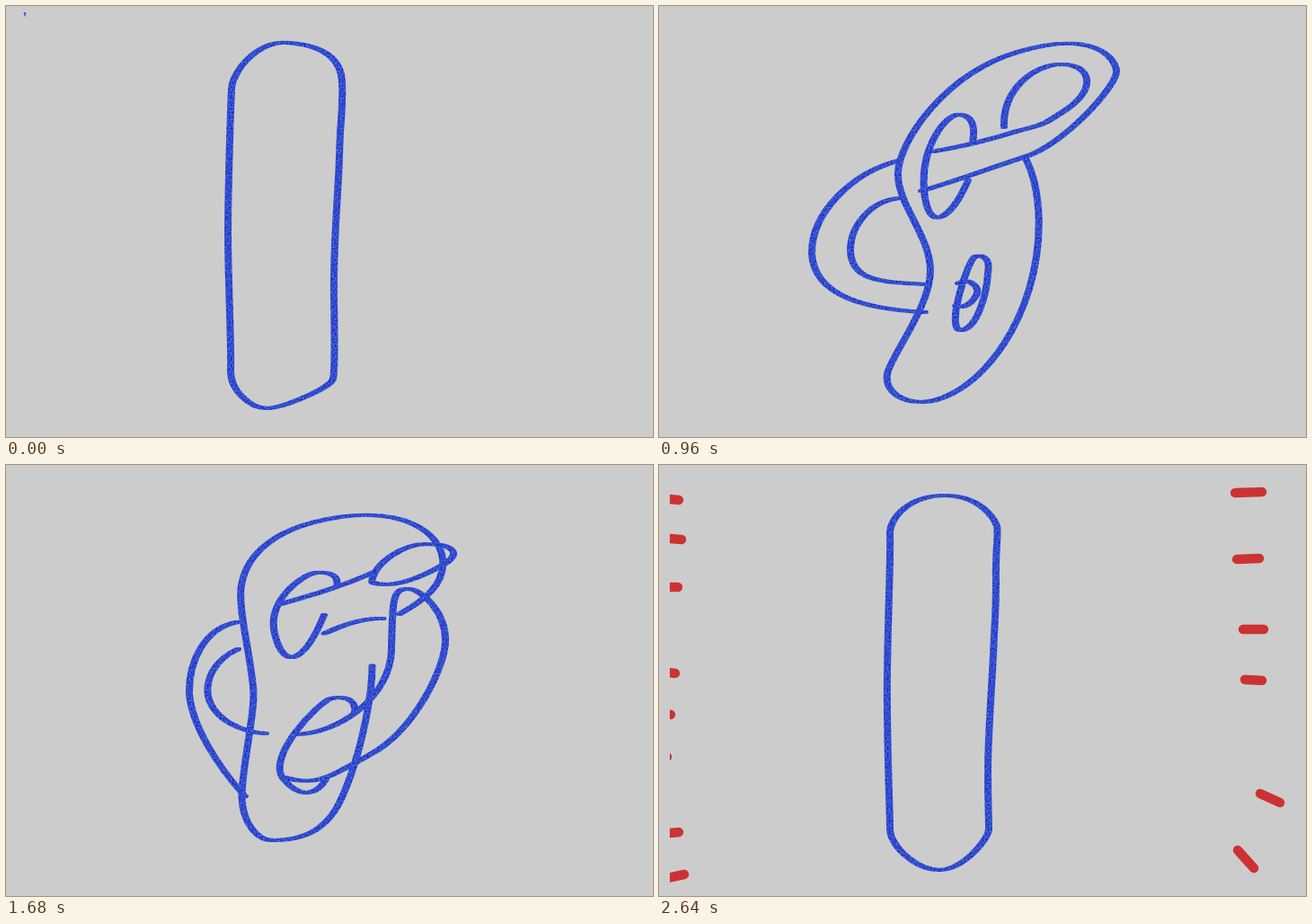
These frames come from a looping animation (720x480 px, 2.76 s). An HTML page without scripts:

```html
<!DOCTYPE html>
<html lang="en">
<head>
<meta charset="utf-8">
<title>Knotting balloon</title>
<style>
  html, body { margin: 0; width: 100%; height: 100%; overflow: hidden; background: #ccc; }
  svg { display: block; width: 100vw; height: 100vh; }
  path { fill: none; stroke-linecap: round; stroke-linejoin: round; }
  .ink { stroke: #33c; stroke-width: 4; filter: url(#crayon); }

  /* Drawings change every 120 ms: 23 in a loop */
  path, .part { animation: 2760ms -5ms infinite; }
  path { animation-timing-function: steps(4); }
  .part { animation-timing-function: step-end; }

  #body { animation-name: body; }
  #eye { animation-name: eye; }
  #slot { animation-name: slot; }
  #loop { animation-name: loop; }
  #hole { animation-name: hole; }
  #arm { animation-name: arm; }
  #rays { animation-name: rays; stroke: #cd3232; }
  .dot { animation-name: show-dot; }
  .fold { animation-name: show-fold; }
  .bow { animation-name: show-bow; }
  .grip { animation-name: show-grip; }
  .curl { animation-name: show-curl; }
  .burst { animation-name: show-burst; }

  @keyframes show-dot { 0% { opacity: 1 } 4.3478%, 100% { opacity: 0 } }
  @keyframes show-fold { 0% { opacity: 0 } 13.0435% { opacity: 1 } 65.2174%, 100% { opacity: 0 } }
  @keyframes show-bow { 0% { opacity: 0 } 21.7391% { opacity: 1 } 65.2174%, 100% { opacity: 0 } }
  @keyframes show-grip { 0% { opacity: 0 } 26.087% { opacity: 1 } 65.2174%, 100% { opacity: 0 } }
  @keyframes show-curl { 0% { opacity: 0 } 65.2174% { opacity: 1 } 78.2609%, 100% { opacity: 0 } }
  @keyframes show-burst { 0% { opacity: 0 } 86.9565%, 100% { opacity: 1 } }

  @keyframes body {
    0% { d: path("M370 190 C367 245 364 280 365 330 S366 405 364 415 S308 448 290 448 S249 428 250 405 S247 300 247 255 S250 110 251 92 S278 38 315 41 S373 58 374 85 S373 125 372 140 M372 140 C371 160 371 175 370 190") }
    17.3913% { d: path("M384 192 C398 225 400 280 393 325 S368 412 352 428 S315 452 292 452 S250 437 251 415 S275 360 274 325 S256 248 257 205 S300 83 390 55 S520 45 521 72 S435 175 384 191 M384 191 C350 201 330 205 300 211") }
    34.7826% { d: path("M407 168 C427 205 427 265 412 315 S371 396 355 411 S315 441 292 441 S251 429 254 410 S302 335 302 295 S264 220 266 185 S318 75 400 51 S507 56 509 72 S450 155 407 168 M407 168 C364 182 330 195 292 206") }
    52.1739% { d: path("M406 322 C402 345 395 362 382 379 S362 398 345 408 S310 422 295 422 S266 400 266 380 S291 297 291 275 S253 215 258 180 S292 90 400 62 S530 62 532 82 S500 125 467 144 M430 154 C380 152 335 172 300 187") }
    69.5652% { d: path("M409 125 C413 175 395 265 386 310 S369 382 355 397 S318 414 298 414 S260 395 259 360 S259 275 260 240 S264 115 265 95 S280 54 330 56 S436 90 440 128 S428 178 409 188 M409 188 C409 188 409 188 409 188") }
    86.9565% { d: path("M378 190 C377 245 370 290 370 340 S369 392 367 405 S328 447 305 447 S252 425 250 405 S249 260 249 200 S254 105 255 82 S280 34 320 35 S380 55 380 75 S380 115 379 140 M379 140 C379 160 378 175 378 190"); animation-timing-function: steps(2) }
    95.6522%, 100% { d: path("M373 190 C371 240 366 300 366 340 S367 392 367 405 S337 451 312 451 S257 425 257 405 S253 300 254 230 S258 98 257 78 S280 33 320 34 S374 62 376 68 S374 100 375 130 M375 130 C375 155 374 170 373 190") }
  }
  @keyframes eye {
    0%, 17.3913% { d: path("M375 145 C377 95 415 71 448 71 S488 98 458 113 S425 129 400 139 M400 139 C370 150 335 160 303 169") }
    34.7826% { d: path("M384 135 C382 95 415 65 448 65 S487 92 455 114 S425 132 400 139 M400 139 C365 150 330 158 305 162") }
    52.1739%, 100% { d: path("M407 130 C410 110 440 88 468 88 S510 98 485 112 S430 138 408 131 M410 119 C375 135 340 145 305 155") }
  }
  @keyframes slot {
    0%, 17.3913% { d: path("M334 160 C338 135 337 123 330 124 S298 165 299 206 S313 249 328 207") }
    34.7826% { d: path("M349 152 C353 130 346 121 333 121 S291 155 295 205 S325 238 344 194") }
    52.1739%, 100% { d: path("M368 135 C371 122 359 119 345 120 S290 150 299 188 S330 225 354 167") }
  }
  @keyframes loop {
    0%, 17.3913% { d: path("M260 178 C257 195 256 212 257 220 C260 250 274 290 274 325 M258 190 C257 200 257 212 257 220 C260 250 272 280 274 310") }
    34.7826% { d: path("M268 172 C215 185 170 230 170 275 C172 325 235 338 296 341 M267 214 C235 217 213 245 213 272 C214 308 250 307 296 310") }
    52.1739%, 100% { d: path("M257 175 C220 182 203 220 204 255 C207 290 235 335 266 369 M258 205 C230 218 222 240 225 258 C232 285 265 298 289 299") }
  }
  @keyframes hole {
    0%, 34.7826% { d: path("M366 297 C369 280 360 277 352 279 S318 362 336 361 S365 320 366 297") }
    52.1739%, 100% { d: path("M388 275 C390 260 375 257 362 260 S288 325 309 350 S348 364 356 350") }
  }
  @keyframes arm {
    0%, 34.7826% { d: path("M333 309 C338 306 344 306 347 308 S352 311 353 313 S355 317 354 320 S350 327 347 330 S336 337 330 334") }
    52.1739%, 100% { d: path("M322 300 C368 300 428 260 429 205 S430 138 447 138 S489 165 489 195 S455 295 406 322 S345 358 310 348") }
  }
  @keyframes rays {
    0%, 86.9565% {
      d: path("M118 51L179 61M111 90L175 101M111 150L170 153M99 211L163 211M109 261L168 253M90 307L162 302M103 354L166 345M118 390L177 382M128 437L169 428M450 64L533 46M462 115L541 106M469 168L537 167M474 221L556 223M459 294L562 321M453 341L541 373M440 411L487 452");
      stroke-width: 7.5px; animation-timing-function: steps(2);
    }
    95.6522%, 100% {
      d: path("M0 37L22 39M0 81L25 83M0 136L21 136M0 230L18 232M0 276L13 278M0 325L9 325M0 411L22 409M0 462L28 456M0 500L20 495M641 31L671 30M643 105L668 104M650 183L673 183M652 239L671 240M669 366L691 376M644 429L662 449M590 500L605 515");
      stroke-width: 10.5px;
    }
  }
</style>
</head>
<body>
<svg viewBox="0 0 720 480">
  <!-- A pen wider than tall, with mottled ink -->
  <filter id="crayon" filterUnits="userSpaceOnUse" x="0" y="0" width="720" height="480" color-interpolation-filters="sRGB">
    <feMorphology in="SourceAlpha" operator="dilate" radius="2 0" result="line"/>
    <feTurbulence type="fractalNoise" baseFrequency=".5" numOctaves="2"/>
    <feColorMatrix values="0 0 0 0 .2  0 0 0 .8 -.1  0 0 0 0 .81  0 0 0 0 1"/>
    <feComposite in2="line" operator="in"/>
  </filter>

  <g class="ink">
    <path id="body"/>
    <g class="part fold"><path id="eye"/><path id="slot"/></g>
    <g class="part bow"><path id="loop"/></g>
    <g class="part grip"><path id="hole"/><path id="arm"/></g>
    <g class="part curl">
      <path d="M371 138C376 158 352 165 350 150C352 126 420 120 424 143C424 152 414 154 411 150M391 133C396 160 386 172 377 163C374 153 388 150 391 156"/>
    </g>
  </g>
  <g class="part dot"><path d="M21 7.5V11M20 8H22" stroke="#33c" stroke-width="1.2"/></g>
  <g class="part burst"><path id="rays"/></g>
  <rect width="12" height="480" fill="#ccc"/>
</svg>
</body>
</html>
```
